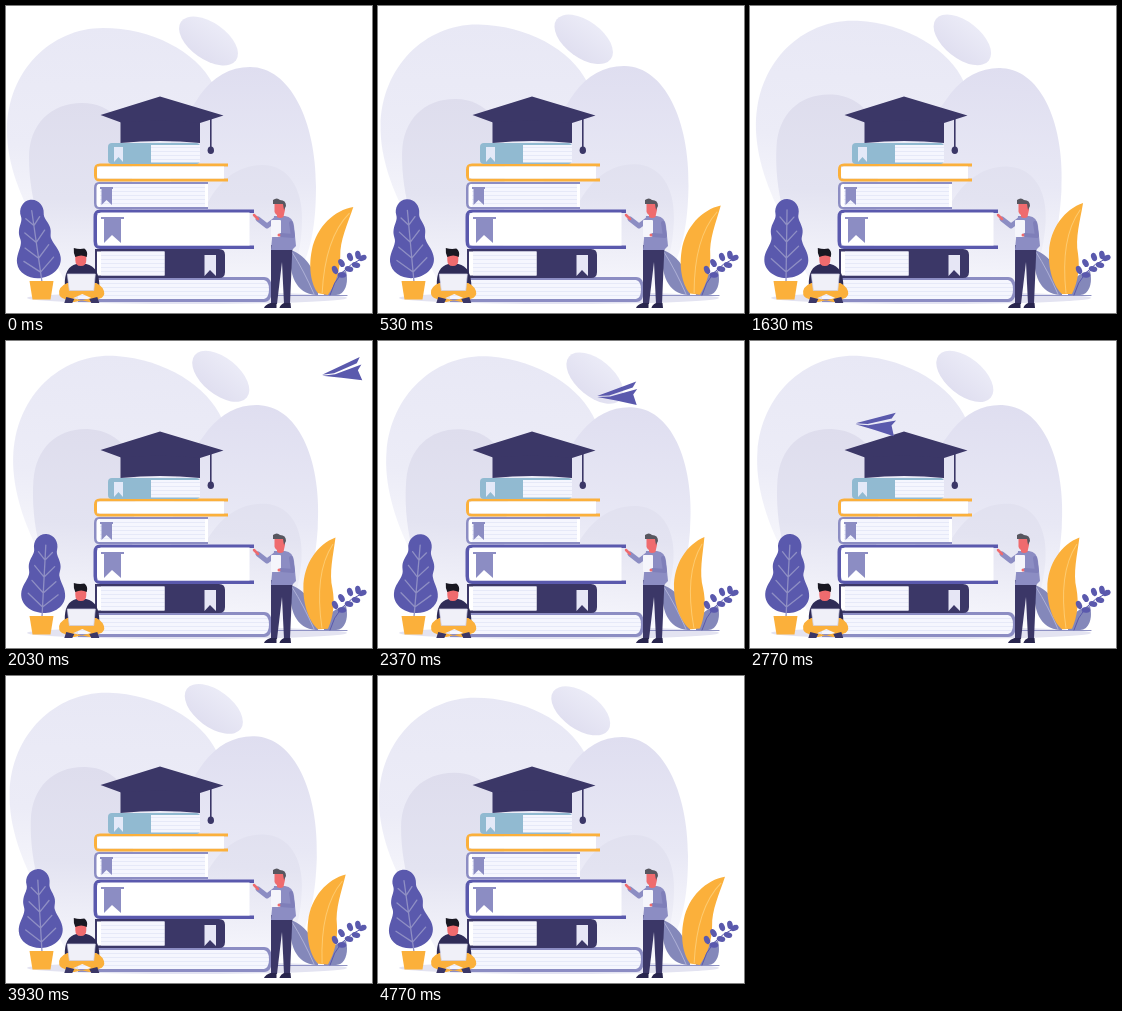
Write an HTML page that moves like this. It is 366x307 px and loops after 4810 ms.

```html
<!DOCTYPE html>
<html lang="en">
<head>
<meta charset="utf-8">
<title>Stack of books</title>
<style>
  html, body { margin: 0; width: 100%; height: 100%; overflow: hidden; background: #fff; }
  svg { display: block; width: 366px; height: 307px; }
  .navy { fill: #3b3767; }
  .violet { fill: #5a59ad; }
  .lilac { fill: #8c8dc3; }
  .slate { fill: #8488ba; }
  .gold { fill: #fbb03b; }
  .skin { fill: #ef6b6e; }
  .pages { fill: url(#pages); }
  .line { fill: none; stroke-linecap: round; stroke-linejoin: round; }
</style>
</head>
<body>
<svg viewBox="0 0 366 307">
  <defs>
    <linearGradient id="pale" gradientUnits="userSpaceOnUse" x1="0" y1="20" x2="0" y2="285">
      <stop offset="0" stop-color="#e8e8f5"/>
      <stop offset=".45" stop-color="#ececf7"/>
      <stop offset="1" stop-color="#fff"/>
    </linearGradient>
    <linearGradient id="mid" gradientUnits="userSpaceOnUse" x1="0" y1="60" x2="0" y2="290">
      <stop offset="0" stop-color="#dfdef0"/>
      <stop offset=".5" stop-color="#e8e8f5"/>
      <stop offset="1" stop-color="#fdfdff"/>
    </linearGradient>
    <linearGradient id="deep" gradientUnits="userSpaceOnUse" x1="0" y1="95" x2="0" y2="290">
      <stop offset="0" stop-color="#dedded"/>
      <stop offset=".5" stop-color="#e3e3f1"/>
      <stop offset="1" stop-color="#f8f8fd"/>
    </linearGradient>
    <linearGradient id="pebble" x1="0" y1="0" x2="0" y2="1">
      <stop offset="0" stop-color="#ebebf7"/>
      <stop offset="1" stop-color="#e0dff0"/>
    </linearGradient>
    <pattern id="pages" width="8" height="4" patternUnits="userSpaceOnUse">
      <rect width="8" height="4" fill="#f5f6fe"/>
      <rect y="1" width="8" height="1" fill="#e6e9f8"/>
    </pattern>
  </defs>

  <g id="backdrop">
    <path fill="url(#pale)" d="M1 125C1 65 45 22 97 22C145 22 190 45 207 78C225 120 240 200 225 290H90C55 262 1 190 1 125Z"/>
    <path fill="url(#mid)" d="M194 89C207 71 224 61 244 61C284 61 310 115 310 180C310 235 300 270 270 290H165V130C176 120 184 104 194 89Z"/>
    <path fill="url(#deep)" d="M23 152C23 118 45 97 76 97C106 97 124 120 126 150V280H62C38 240 23 195 23 152Z"/>
    <path fill="url(#deep)" d="M200 200C212 175 232 159 256 159C282 159 296 182 296 212C296 245 288 270 275 282H200Z"/>
    <ellipse fill="url(#pebble)" rx="33.6" ry="18.4" transform="translate(202.5 35) rotate(35)"/>
  </g>

  <ellipse cx="181" cy="292" rx="160" ry="6" fill="#e3e3f1"/>
  <path class="line" stroke="#8f92c4" stroke-width="1.2" d="M266 289.500H341"/>

  <g id="tree">
    <path class="violet" d="M36 193C44 193 49 201 47.500 208C46.500 213 50 216 51.500 222C53 228 50 231 51.500 235C53 241 58 246 58 254C58 265 47 272 36 272C25 272 14 265 14 254C14 246 19 241 20.500 235C22 231 19 228 20.500 222C22 216 25.500 213 24.500 208C23 201 28 193 36 193Z"/>
    <path class="line" stroke="#8f8fc4" stroke-width="1.300" d="M36 204V277M36 219L43 211M36 219L29 211M36 236L46 225M36 236L26 225M36 252L48 240M36 252L24 240M36 266L51 253M36 266L21 253"/>
  </g>
  <path class="gold" d="M23.500 275H47.500L44.500 293.500H26.500Z"/>

  <g>
    <path class="slate" d="M310 289C290 288 282 268 285 244C301 250 313 268 312 289Z"/>
    <path class="line" stroke="#b4b6da" stroke-width=".9" d="M286 246Q298 265 308 288"/>
    <path class="slate" d="M318 289C318 277 327 267 340 265C343 277 339 289 330 289Z"/>
    <g id="leaf">
      <path class="gold" d="M333 197C315 203 300 222 299 246C298 266 305 282 312 288H322C328 276 330 262 328 248C325 232 330 215 333 197Z"/>
      <path class="line" stroke="#fdcb70" stroke-width="1" d="M330 204Q310 232 316 287"/>
    </g>
    <path class="line" stroke="#5a59ad" d="M324 289Q331 263 357 252"/>
    <g id="sprig" class="violet"></g>
  </g>

  <!-- books, bottom up -->
  <path class="lilac" d="M72 271H258Q266 271 266 283.500T258 296H72Z"/>
  <path class="pages" d="M72 274H258Q263 275 263 283.500T258 293H72Z"/>

  <path class="navy" d="M89 243H213Q219 243 219 249V266Q219 272 213 272H89Z"/>
  <rect x="91" y="245.500" width="67.500" height="24" fill="#fff"/>
  <rect class="pages" x="95" y="245.500" width="63.500" height="24"/>
  <path fill="#e6e6f5" d="M198.500 249H210V270L204 264L198.500 270Z"/>

  <path class="violet" d="M248 203.500H94Q87.500 203.500 87.500 211V235Q87.500 243 94 243H248V239.500H91.500V207H248Z"/>
  <path fill="#fff" d="M243.500 206.500H95Q91 207 91 211V235Q91 239.500 95 239.500H243.500Z"/>
  <path class="lilac" d="M95 211H118V213H115V237L106 229L98 237V213H95Z"/>

  <path class="lilac" d="M202 176H93Q88 176 88 182V197Q88 203 93 203H202Z"/>
  <path fill="#fff" d="M202 178H93Q90.500 178 90.500 182V197Q90.500 201 93 201H202Z"/>
  <rect class="pages" x="94" y="178" width="105" height="23"/>
  <path class="lilac" d="M94 181H107V183H106V199L100.500 194L95.500 199V183H94Z"/>

  <path class="gold" d="M222 157.500H94Q88 157.500 88 163.500V169.500Q88 175.500 94 175.500H222V172.500H91V160.500H222Z"/>
  <path fill="#fff" d="M218 160.500H94Q91 160.500 91 163.500V169.500Q91 172.500 94 172.500H218Z"/>

  <rect x="102" y="137" width="92" height="21" rx="4" fill="#91bad1"/>
  <rect class="pages" x="145" y="139" width="49" height="17.500"/>
  <path fill="#e3e9f8" d="M108 141H117V156L112.500 151L108 156Z"/>

  <g class="navy">
    <path d="M114.500 112H194V137Q154 133 114.500 137Z"/>
    <path d="M94.500 109L154 90.500L217.500 109.500L194 117Q154 113 115 116.500Z"/>
    <path d="M204 112H205.600V142H204Z"/>
    <ellipse cx="204.800" cy="144.300" rx="3.200" ry="3.800"/>
  </g>

  <!-- reader with laptop -->
  <g transform="translate(-.7 0)">
    <path fill="#2f2c57" d="M59.500 279Q59 261 71 258H81Q94 261 94 280Z"/>
    <path class="skin" d="M70 249H81V254Q81 260 75.500 260T70 254Z"/>
    <path fill="#191822" d="M68.500 242Q74 243.500 79 242.500Q83 245 81.500 251Q76 248 70 251Q68 247 68.500 242Z"/>
    <path class="gold" d="M62 277Q52 281 54 289Q57 295 68 292L77 288L86 292Q97 295 99 288Q99 281 91 277Z"/>
    <path class="gold" d="M58 290L84 296H68Q60 296 58 290ZM95 290L69 296H86Q93 296 95 290Z"/>
    <path class="navy" d="M61 291L69 293L67 297H59ZM92 291L84 293L86 297H94Z"/>
    <path fill="#f0f0f8" stroke="#cfcfe5" stroke-width=".7" d="M62 268H90L88.500 284.500H64Z"/>
  </g>

  <!-- presenter -->
  <path class="navy" d="M265 239H286.500L284 298H278L276 256L271 298H265Z"/>
  <path fill="#28254d" d="M264.500 297H270.500V302H258Q259 299 264.500 297ZM278 297H284.500L285 302H273.500Q274 299 278 297Z"/>
  <path class="line" stroke="#8c8dc3" stroke-width="5" d="M269 214L261 220L252 213"/>
  <path class="line" stroke="#ef6b6e" stroke-width="2.500" d="M252 213L248 209"/>
  <path class="lilac" d="M268 210H279Q287 211 288 220L290 240L286 244H265Z"/>
  <path class="skin" d="M268.500 197H279V204Q278 208 277.500 211Q274 213 271 211V209Q268 207 268.500 204Z"/>
  <path fill="#57565f" d="M267 194Q271 191 274 194Q280 194 280 200L278 204L277 198L267 198Z"/>
  <rect x="265" y="214" width="10" height="17" rx="1" fill="#f5f5fb"/>
  <path class="line" stroke="#7f7fb9" stroke-width="4" d="M285 217L287 230L275 229"/>
  <circle class="skin" cx="273" cy="229" r="1.500"/>

  <g id="plane" class="violet">
    <path d="M-39 14.500L0 0L-3.500 6L-27 14Z"/>
    <path d="M-39 15.500L-26 15L1 7.500L-3 13L0.500 23.500L-20 19Z"/>
  </g>
</svg>
<script>
  const LOOP = 4810;
  const $ = id => document.getElementById(id);
  const place = (el, value) => el.setAttribute("transform", value);

  // x, y, angle of each leaflet
  const leaflets = [
    [329, 264, 65], [335.5, 257, 60], [344, 251, 70], [336, 269, 5],
    [343, 263, 10], [350, 259, 15], [352, 249, 80], [356.5, 252, -25]
  ];
  for (const [x, y, angle] of leaflets) {
    const leaf = document.createElementNS("http://www.w3.org/2000/svg", "ellipse");
    leaf.setAttribute("rx", 4.3);
    leaf.setAttribute("ry", 2.8);
    place(leaf, `translate(${x} ${y}) rotate(${angle})`);
    $("sprig").append(leaf);
  }

  function draw(now) {
    const t = now % LOOP;
    const p = 1 - Math.abs(1 - 2 * t / LOOP);
    place($("backdrop"), `translate(0 ${-12 * p * (1 - p)}) rotate(${4.8 * p} 182 209)`);
    place($("tree"), `rotate(${13.3 * p - 8.2} 36 276)`);
    place($("leaf"), `rotate(${9.2 - 13.5 * p} 316 288)`);

    const d = t - 2370;
    const x = 258.5 - 0.281 * d;
    const y = 40.5 + 0.075 * d + 8e-6 * d * d;
    place($("plane"), `translate(${x} ${y}) rotate(${0.0145 * d})`);
    $("plane").style.display = x > -10 && x < 410 ? "" : "none";
  }

  const start = performance.now();
  function tick() {
    draw(performance.now() - start);
    requestAnimationFrame(tick);
  }
  tick();
</script>
</body>
</html>
```
